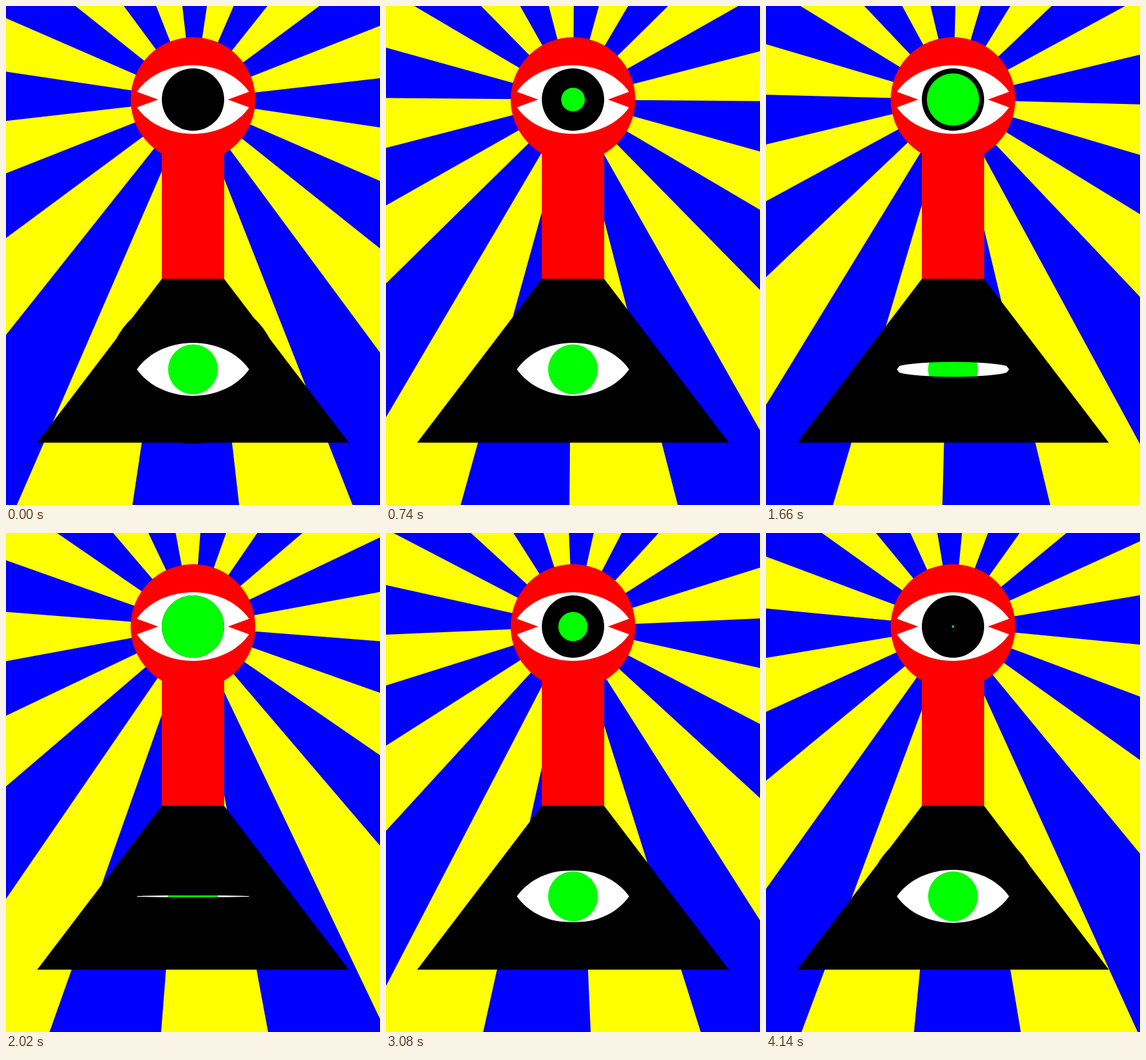
These frames come from a looping animation (600x800 px, 4160 ms). An HTML page with a canvas:

```html
<!DOCTYPE html>
<html lang="en">
<head>
<meta charset="utf-8">
<title>Eye and pyramid</title>
<style>
html, body { margin: 0; width: 100%; height: 100%; overflow: hidden; background: #00f; }
canvas { display: block; }
</style>
</head>
<body>
<canvas id="stage" width="600" height="800"></canvas>
<script>
const ctx = document.getElementById('stage').getContext('2d');
const STEP = 20, STEPS = 208;
const CX = 300, TOP_Y = 150, LOW_Y = 582.5;
const RAD = Math.PI / 180;

function disc(x, y, r, color) {
  ctx.fillStyle = color;
  ctx.beginPath();
  ctx.arc(x, y, r, 0, 2 * Math.PI);
  ctx.fill();
}

function rays(turn) {
  ctx.fillStyle = '#00f';
  ctx.fillRect(0, 0, 600, 800);
  ctx.fillStyle = '#ff0';
  ctx.beginPath();
  for (let k = 0; k < 12; k++) {
    const a = (68.5 + turn + k * 30) * RAD;
    const b = a + 15 * RAD;
    ctx.moveTo(CX, TOP_Y);
    ctx.lineTo(CX + 1000 * Math.cos(a), TOP_Y + 1000 * Math.sin(a));
    ctx.lineTo(CX + 1000 * Math.cos(b), TOP_Y + 1000 * Math.sin(b));
    ctx.closePath();
  }
  ctx.fill();
}

// Eye white: two lids, moved apart by 2 * gap, with notched corners when open
function eyeWhite(y, gap) {
  const bend = 170 / 3;
  const up = y - gap, down = y + gap;
  ctx.fillStyle = '#fff';
  ctx.beginPath();
  ctx.moveTo(210, up);
  ctx.bezierCurveTo(250, up - bend, 350, up - bend, 390, up);
  if (gap) ctx.lineTo(356, y);
  ctx.lineTo(390, down);
  ctx.bezierCurveTo(350, down + bend, 250, down + bend, 210, down);
  if (gap) ctx.lineTo(244, y);
  ctx.closePath();
  ctx.fill();
}

// Black ring whose opening narrows to close the lower eye
function eyelid(open) {
  ctx.fillStyle = '#000';
  ctx.beginPath();
  ctx.ellipse(CX, LOW_Y, 135, open + 45, 0, 0, 2 * Math.PI);
  ctx.closePath();
  ctx.moveTo(CX + 96, LOW_Y);
  ctx.ellipse(CX, LOW_Y, 96, open, 0, 0, 2 * Math.PI);
  ctx.fill('evenodd');
}

function pupilSize(n) {
  if (n <= 100) return n + 1;
  return Math.abs(n <= 202 ? 201 - n : n - 203);
}

function lidOpening(n) {
  return 0.75 * (n <= 201 ? Math.abs(n - 99) : 303 - n);
}

function draw(n) {
  rays(n);

  disc(CX, TOP_Y, 100, '#f00');
  ctx.fillRect(250, 200, 100, 240);
  eyeWhite(TOP_Y, 12.5);
  disc(CX, TOP_Y, 50, '#000');
  const size = pupilSize(n);
  if (size > 1) disc(CX, TOP_Y, size / 2, '#0f0');

  ctx.fillStyle = '#000';
  ctx.beginPath();
  ctx.moveTo(250, 437.5);
  ctx.lineTo(350, 437.5);
  ctx.lineTo(550, 700);
  ctx.lineTo(50, 700);
  ctx.fill();

  eyeWhite(LOW_Y, 0);
  disc(CX, LOW_Y, 40, '#0f0');
  eyelid(lidOpening(n));
}

const start = performance.now();
function tick() {
  const t = Math.max(0, performance.now() - start);
  draw(Math.floor(t / STEP) % STEPS);
  requestAnimationFrame(tick);
}
tick();
</script>
</body>
</html>
```
